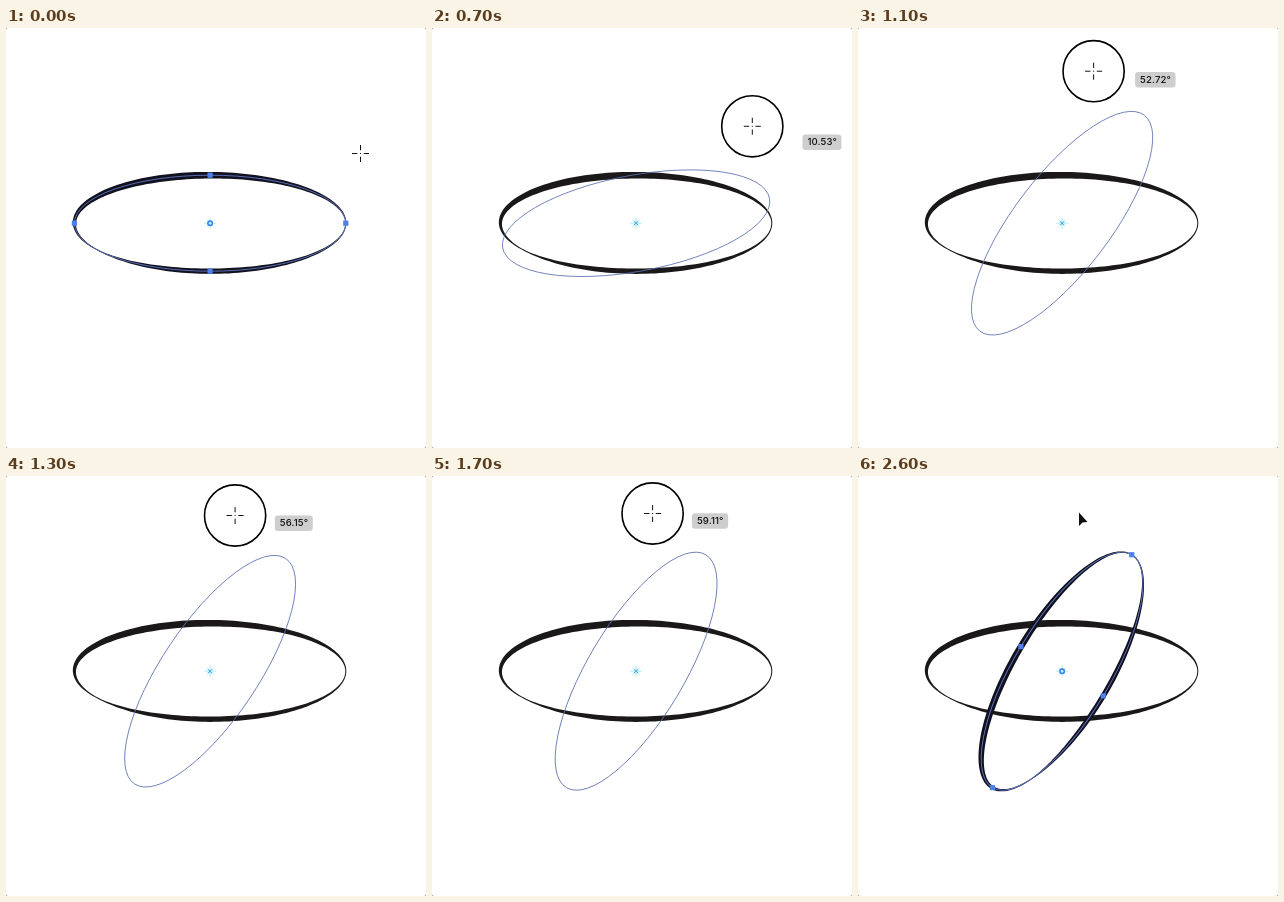
These frames come from a looping animation (420 px wide and 420 px high, 2700 ms). An HTML page:

```html
<!DOCTYPE html>
<html lang="en">
<head>
<meta charset="utf-8">
<title>Rotating an ellipse</title>
<style>
  html, body { margin: 0; width: 100%; height: 100%; overflow: hidden; background: #8c8c8c; }
  svg { display: block; width: 420px; height: 420px; background: #fff; border-radius: 2px; }
  .ink { fill: #1b1819; fill-rule: evenodd; }
  .selected .ink { fill: #12111f; }
  .spine { fill: none; stroke: #5f78c4; stroke-width: .9; }
  .handle { fill: #4d80e8; }
  .spine, .handle { display: none; }
  .selected .spine, .selected .handle { display: inline; }
  #outline { fill: none; stroke: #5f72b0; stroke-width: .8; }
  #ring { fill: none; stroke: #000; stroke-width: 1.6; }
  #cross { stroke: #111; stroke-width: 1; }
  #label rect { fill: #cecece; }
  #label text { font: 500 9.6px Inter, Roboto, sans-serif; letter-spacing: .12px; fill: #111; }
</style>
</head>
<body>
<svg viewBox="0 0 420 420">
  <g transform="translate(204.1 195.2)">
    <g id="base"></g>
    <g id="copy"></g>
    <ellipse id="outline"/>
    <path d="M-6 0H6M0-6V6M-3.6-3.6L3.6 3.6M-3.6 3.6L3.6-3.6" stroke="#b5ecfb"/>
    <circle r="3" fill="#c9f1fc"/>
    <path id="pivot" d="M-1.8-1.8L1.8 1.8M-1.8 1.8L1.8-1.8" stroke="#3a9fd6"/>
    <circle id="dot" r="2.2" fill="#c5ecff" stroke="#2f86e6" stroke-width="1.5"/>
  </g>
  <g id="pointer">
    <circle id="ring" r="30.6"/>
    <path id="cross" d="M-8.5 0H-3.2M3.2 0H8.5M0-8.5V-3.2M0 3.2V8.5M-.5 0H.5"/>
  </g>
  <path id="arrow" d="M221 36.5V50L224.5 46.5L229.5 46Z" fill="#111"/>
  <g id="label">
    <rect height="15.5" rx="3"/>
    <text x="5" y="10.6"></text>
  </g>
</svg>
<script>
const LOOP = 2700, STEP = 100, RX = 135.7, RY = 48;
const PRESS_END = 300, DRAG_START = 600, SLOWDOWN = 900, RELEASE = 2000;
const LABEL_LAG = 32, LABEL_OFFSET = 39.2;
const $ = id => document.getElementById(id);
const rad = deg => deg * Math.PI / 180;

// Two swells of the brush, clockwise from the right-hand anchor, meeting at PINCH
const PINCH = 145;
const swell = u => Math.sin(Math.PI * u) ** 1.4;
const thickness = deg => 1 + (deg < PINCH
  ? 4.4 * swell((deg / PINCH) ** 1.4)
  : 5.8 * swell((deg - PINCH) / (360 - PINCH)));

const onEllipse = deg => [RX * Math.cos(rad(deg)), RY * Math.sin(rad(deg))];

function edge(side) {
  const points = [];
  for (let deg = 0; deg < 360; deg += 2) {
    const [x, y] = onEllipse(deg);
    const nx = x / RX ** 2, ny = y / RY ** 2;
    const offset = side * thickness(deg) / 2 / Math.hypot(nx, ny);
    points.push(`${x + nx * offset} ${y + ny * offset}`);
  }
  return `M${points.join('L')}Z`;
}

function drawBrushed(id, angle) {
  const handles = [0, 90, 180, 270].map(deg =>
    `<rect class="handle" x="-2.6" y="-2.6" width="5.2" height="5.2"
      transform="translate(${onEllipse(deg)}) rotate(${angle})"/>`);
  $(id).innerHTML = `<path class="ink" d="${edge(1)}${edge(-1)}"/>
    <ellipse class="spine" rx="${RX}" ry="${RY}"/>${handles.join('')}`;
  $(id).setAttribute('transform', `rotate(${-angle})`);
}

// Key points of the drag: time, pointer x, pointer y, rotation
const DRAG = [
  [DRAG_START, 354.5, 125.5, 0],
  [700, 320.3, 98.3, 10.53],
  [SLOWDOWN, 264.8, 59.8, 37.35],
  [1300, 229.1, 39.5, 56.15],
  [1700, 220.6, 37.5, 59.11]
];
const easeOut = u => (1 - Math.exp(-3 * u)) / (1 - Math.exp(-3));

function dragAt(t) {
  const next = DRAG.findIndex(key => key[0] > t);
  if (next === 0) return DRAG[0].slice(1);
  if (next < 0) return DRAG.at(-1).slice(1);
  const from = DRAG[next - 1], to = DRAG[next];
  const u = (t - from[0]) / (to[0] - from[0]);
  const k = from[0] >= SLOWDOWN ? easeOut(u) : u;
  return from.map((v, i) => v + (to[i] - v) * k).slice(1);
}

const show = (id, on) => $(id).style.display = on ? 'inline' : 'none';
const move = (id, x, y) => $(id).setAttribute('transform', `translate(${x} ${y})`);

function placeLabel(t, angle) {
  const [x, y] = dragAt(t - LABEL_LAG);
  const text = $('label').querySelector('text');
  text.textContent = angle.toFixed(2) + '°';
  $('label').querySelector('rect').setAttribute('width', text.getComputedTextLength() + 9.5);
  move('label', x + LABEL_OFFSET, y - .4);
}

function render(t) {
  const [x, y, angle] = dragAt(t);
  const done = t >= RELEASE, dragging = angle > 0 && !done, arrow = t > RELEASE;
  $('base').classList.toggle('selected', !angle);
  show('copy', done);
  show('outline', dragging);
  show('label', dragging);
  show('pivot', dragging);
  show('dot', !dragging);
  show('pointer', !arrow);
  show('arrow', arrow);
  move('pointer', x, y);
  $('ring').style.opacity = done ? .4 : Math.min(1, t / PRESS_END);
  $('outline').setAttribute('transform', `rotate(${-angle})`);
  if (dragging) placeLabel(t, angle);
}

drawBrushed('base', 0);
drawBrushed('copy', DRAG.at(-1)[3]);
$('copy').classList.add('selected');
$('outline').setAttribute('rx', RX);
$('outline').setAttribute('ry', RY);

const start = performance.now();
function tick() {
  const t = (performance.now() - start) % LOOP;
  render(Math.floor(t / STEP) * STEP);
  requestAnimationFrame(tick);
}
tick();
</script>
</body>
</html>
```
